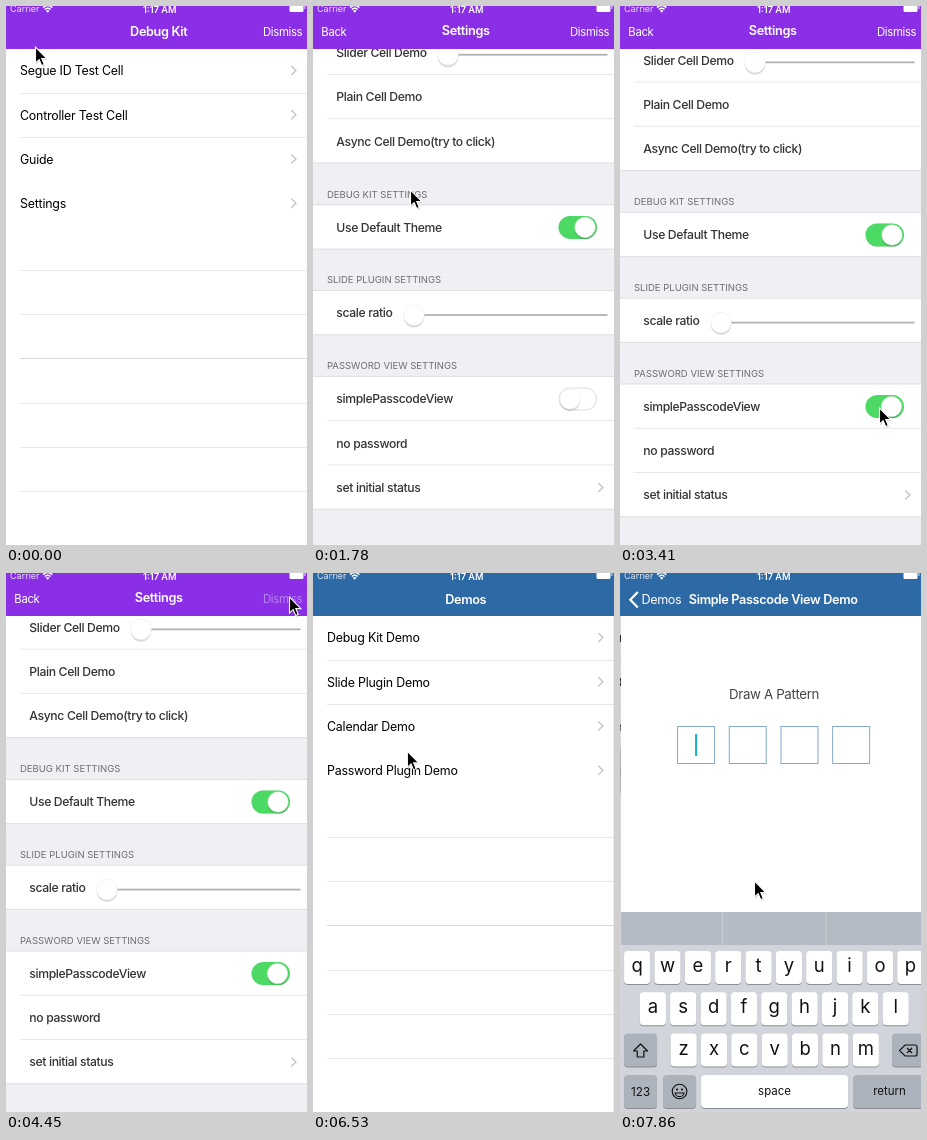
Animation of 301 by 539 pixels, one loop 8 s. Source, as an HTML page:

```html
<!DOCTYPE html>
<html lang="en">
<head>
<meta charset="utf-8">
<title>Settings walkthrough</title>
<style>
  html, body { margin: 0; width: 100%; height: 100%; overflow: hidden; background: #fff; }
  svg { display: block; overflow: hidden; }
  #stage { width: 100%; height: 100%; }
  text { font-family: Inter, Roboto, sans-serif; letter-spacing: -.027em; white-space: pre; }
  .caps { letter-spacing: 0; }
  .row { letter-spacing: -.017em; }
  .cell { letter-spacing: -.03em; font-weight: 500; }
</style>
</head>
<body>
<svg id="stage" viewBox="0 0 301 539"></svg>
<script>
const W = 301, H = 539, ROW = 44.25, BAR = 43;
const LOOP = 8000, STEP = 148, LAST = 53;
const PURPLE = '#8a2fe6', BLUE = '#2d69a5', LINE = '#e8e8ea', DARK = '#333';

// ---- drawing helpers ----
const rect = (x, y, w, h, fill, extra = '') =>
  `<rect x="${x}" y="${y}" width="${w}" height="${h}" fill="${fill}" ${extra}/>`;
const group = (id, body, extra = '') => `<g id="${id}" ${extra}>${body}</g>`;
const path = (d, stroke, width, extra = '') =>
  `<path d="${d}" fill="none" stroke="${stroke}" stroke-width="${width}" ${extra}/>`;
// y is the middle of the capitals
const label = (s, x, y, size = 12.3, fill = '#000', extra = '') =>
  `<text x="${x}" y="${y + size * 0.36}" font-size="${size}" fill="${fill}" ${extra}>${s}</text>`;
const MID = 'text-anchor="middle"';
const title = (s, y) => label(s, 152.7, y, 12.7, '#fff', `${MID} font-weight="600"`);
const chevron = y => path(`M285.3 ${y - 4.5}l4.6 4.5l-4.6 4.5`, '#c4c4c9', 1.4);
const dim = id => rect(0, 0, W, H, '#000', `id="${id}" opacity="0"`);
const knob = (x, y, r, id = '') =>
  `<g id="${id}"><circle cx="${x}" cy="${y + 2}" r="${r}" fill="#000" opacity=".15"/>` +
  `<circle cx="${x}" cy="${y}" r="${r}" fill="#fff" stroke="#e6e6e6" stroke-width=".5"/></g>`;

function menu(rows, pickId) {
  let s = rect(0, 0, W, H, '#fff');
  for (const i of [1, 2, 5, 6, 7, 8, 9, 10])
    s += rect(14, Math.floor(BAR + i * ROW), W, 1, i === 7 ? '#dadada' : LINE);
  s += rect(0, 176, W, 44, '#d9d9d9', `id="${pickId}"`);
  rows.forEach((name, i) => {
    const y = 65 + i * ROW;
    s += label(name, 14, y, 12.4, '#000', 'class="row"') + chevron(y - .5);
  });
  return s;
}

// ---- settings page ----
const toggle = (y, id, on) =>
  rect(246, y - 11, 37.5, 22, '#fff', 'rx="11" stroke="#dcdcdc"') +
  rect(245.5, y - 11.5, 38.5, 23, '#4cd964', `rx="11.5" id="${id}-on" opacity="${on}"`) +
  knob(on ? 272 : 257, y, 10.2, id + '-knob');
const slider = (x, y) => rect(x, y - 1, 294.5 - x, 1.8, '#b2b2b4') + knob(x, y, 10.3);

const sections = [
  { top: 83.5, head: 'DEBUG KIT DEMO', cells: [
    ['Detail Cell Demo'], ['INPUT CELL DEFAULT VALUE'],
    ['Switch Cell Demo', y => toggle(y, 'demo', 0)],
    ['Slider Cell Demo', y => slider(135, y + 2)],
    ['Plain Cell Demo'], ['Async Cell Demo(try to click)']] },
  { top: 390.8, head: 'DEBUG KIT SETTINGS', cells: [['Use Default Theme', y => toggle(y, 'theme', 1)]] },
  { top: 476.5, head: 'SLIDE PLUGIN SETTINGS', cells: [['scale ratio', y => slider(101, y + 2)]] },
  { top: 562.4, head: 'PASSWORD VIEW SETTINGS', cells: [
    ['simplePasscodeView', y => toggle(y, 'pass', 0)], ['no password'],
    ['set initial status', chevron]] }
];

function section({ top, head, cells }) {
  const h = cells.length * ROW;
  let s = label(head, 14, top - 10.5, 9.5, '#6d6d72', 'class="caps"') +
    rect(0, top, W, h, '#fff') +
    rect(0, top - .5, W, 1, '#dfdfe3') + rect(0, top + h - .5, W, 1, '#dfdfe3');
  cells.forEach(([name, extra], i) => {
    const y = top + i * ROW + 22.6;
    if (i) s += rect(14, top + i * ROW - .5, W, 1, LINE);
    s += name.startsWith('INPUT')
      ? label(name, 21.7, y, 10.3, '#000', 'class="row"')
      : label(name, 23.3, y, 12.2, DARK, 'class="cell"');
    if (extra) s += extra(y);
  });
  return s;
}

const settingsPage =
  group('edge', rect(-4, 0, 4, H, '#000', 'opacity=".03"') +
    rect(-1.5, 0, 1.5, H, '#000', 'opacity=".07"')) +
  `<svg width="${W}" height="${H}">` +
  rect(0, 0, W, H, '#efeff4') + group('scroll', sections.map(section).join('')) +
  rect(0, 0, W, BAR, PURPLE) + title('Settings', 24.5) +
  label('Back', 8.3, 26, 11.3, '#fff') +
  label('Dismiss', 257, 26, 11.3, '#fff', 'id="dismiss"') + '</svg>';

const homePage =
  menu(['Segue ID Test Cell', 'Controller Test Cell', 'Guide', 'Settings'], 'home-pick') +
  rect(0, 0, W, BAR, PURPLE) + title('Debug Kit', 25) +
  label('Dismiss', 257, 26, 11.3, '#fff') + dim('home-dim');

// ---- passcode page ----
function key(x, y, w, s = '', size = 12, special = false) {
  const cy = y + (size > 14 ? 14.5 : 16.3);
  return rect(x, y + 1, w, 33, '#8b8e94', 'rx="4"') +
    rect(x, y, w, 33, special ? '#acb3bd' : '#fff', 'rx="4"') +
    label(s, x + w / 2, cy, size, '#111', `${MID} class="caps"`);
}
const keyRow = (letters, x, y) =>
  [...letters].map((c, i) => key(x + i * 30.35, y, 26.2, c, 18.5)).join('');

const keyboard =
  rect(0, 339, W, 200, '#d1d5db') + rect(0, 339, W, 33, '#b5bbc4') +
  rect(101, 339, 1, 33, '#cdd1d7') + rect(204.5, 339, 1, 33, '#cdd1d7') +
  keyRow('qwertyuiop', 3, 378) + keyRow('asdfghjkl', 18.7, 419.3) + keyRow('zxcvbnm', 49.5, 460.6) +
  key(3, 460.6, 33, '', 12, true) + key(271, 460.6, 34, '', 12, true) +
  key(3, 502, 33, '123', 11.7, true) + key(42, 502, 33, '', 12, true) +
  key(80, 502, 147, 'space', 11.5) + key(232, 502, 73, 'return', 11.5, true) +
  path('M19.5 471l-7 7h3.7v6h6.6v-6h3.7z', '#111', 1.2, 'stroke-linejoin="round"') +
  path('M284 472h10q2 0 2 2v7q0 2-2 2h-10l-5.5-5.5zM286 475l5 5m0-5l-5 5', '#111', 1.2) +
  '<circle cx="58.5" cy="518.5" r="7.3" fill="none" stroke="#111" stroke-width="1.1"/>' +
  '<circle cx="56" cy="516.5" r="1"/><circle cx="61" cy="516.5" r="1"/>' +
  path('M54 520a4.6 4.6 0 0 0 9 0z', '#111', 1.1);

const passcodePage =
  rect(-1, BAR, 1, H, '#000', 'opacity=".07"') + rect(0, BAR, W, H, '#fff') +
  label('Draw A Pattern', 153, 121, 13.3, '#444', MID) +
  [0, 1, 2, 3].map(i =>
    rect(56.5 + i * 51.7, 153.5, 37, 37, '#fff', 'stroke="#86a9cb"')).join('') +
  rect(74, 161, 2, 22, '#14b4c4') + keyboard;

// ---- whole stage ----
const demosBar =
  rect(0, 0, W, BAR, BLUE) + group('demos-title', title('Demos', 26.7)) +
  group('passcode-title', title('Simple Passcode View Demo', 26.7)) +
  group('back-label', label('Demos', 21, 26.7, 12.6, '#fff')) +
  path('M17.8 19l-7.5 7.7l7.5 7.7', '#fff', 2.2, 'id="back-arrow"');

const ball = '<circle cx="22" cy="18" r="22" fill="#8a2fe6"/>' +
  label('Debug', 21.5, 18, 11, '#fff', `${MID} font-weight="600"`);

const status =
  label('Carrier', 4, 3.2, 9, '#fff', 'class="caps" opacity=".85"') +
  label('1:17 AM', 153.7, 3.2, 9.2, '#fff', `class="caps" font-weight="600" ${MID}`) +
  path('M37 1.6q4.7-4 9.4 0M38.8 3.5q2.9-2.4 5.8 0', '#fff', 1.4) +
  '<path d="M39.9 4.7q1.8-1.2 3.6 0l-1.8 2z" fill="#fff"/>' +
  rect(283.5, -2, 14, 8, '#fff', 'rx="1.5"') + rect(298.3, 0, 1.2, 3, '#fff', 'opacity=".7"');

const ARROW = 'd="M.5 0V16L4.2 12.6L6.7 18.6L9.3 17.5L6.8 11.6H11.9Z"';
const arrow = `<path ${ARROW} transform="translate(.6 1.2)" opacity=".25"/>` +
  `<path ${ARROW} stroke="#fff" stroke-width="1.1"/>`;

document.getElementById('stage').innerHTML =
  group('demos', menu(['Debug Kit Demo', 'Slide Plugin Demo', 'Calendar Demo', 'Password Plugin Demo'],
    'demos-pick') + dim('demos-dim')) +
  group('passcode', passcodePage) + demosBar + group('ball', ball) +
  group('modal', group('home', homePage) + group('settings', settingsPage)) +
  status + group('cursor', arrow);

// ---- motion ----
const el = id => document.getElementById(id);
const move = (id, x, y = 0) => el(id).setAttribute('transform', `translate(${x} ${y})`);
const fade = (id, a) => el(id).setAttribute('opacity', a);

// critically damped spring, 0 to 1
function spring(ms) {
  if (ms <= 0) return 0;
  const a = ms * 0.018;
  return a > 10 ? 1 : 1 - (1 + a) * Math.exp(-a);
}

// linear track of [step, ...values]
function at(track, k) {
  const j = track.findIndex(p => p[0] > k);
  if (j === 0) return track[0].slice(1);
  if (j < 0) return track[track.length - 1].slice(1);
  const a = track[j - 1], b = track[j], f = (k - a[0]) / (b[0] - a[0]);
  return a.slice(1).map((v, i) => v + (b[i + 1] - v) * f);
}

const pointer = [
  [0, 29, 41], [4, 77, 196], [6, 77, 196], [10, 95, 390], [12, 97, 184], [13, 98, 184],
  [16, 201, 370], [19, 261, 404], [20, 259, 402], [26, 259, 402], [27, 262, 30], [28, 283, 24],
  [30, 283, 24], [35, 289, 25], [38, 289, 25], [39, 131, 189], [46, 79, 174], [47, 86, 196],
  [50, 86, 196], [53, 134, 308]];
const scrollTrack = [[9, 0], [10, 22], [12, 192], [13, 192], [15, 185], [16, 184.4]];
const passTrack = [[21, 0], [22, .5], [23, 1]];
const ballTrack = [[40, 1], [43, 0]];

function draw(time) {
  const k = Math.min(LAST, Math.floor(time / STEP));
  const t = k * 148.3;

  const push = spring(t - 781);
  move('home', -90 * push);
  fade('home-dim', .1 * push);
  move('settings', W * (1 - push));
  fade('edge', Math.min(1, 4 * push));
  fade('home-pick', k >= 4 ? 1 : 0);

  move('scroll', 0, -at(scrollTrack, k)[0]);
  const on = at(passTrack, k)[0];
  fade('pass-on', on);
  move('pass-knob', 14.5 * on);

  fade('dismiss', k >= 30 ? .4 : 1);
  move('modal', 0, H * spring(t - 4500));
  fade('ball', at(ballTrack, k)[0]);

  const enter = spring(t - 7425);
  move('demos', -90 * enter);
  fade('demos-dim', .1 * enter);
  fade('demos-pick', k >= 49 ? 1 : 0);
  move('passcode', W * (1 - enter));
  move('demos-title', -111 * enter);
  fade('demos-title', Math.max(0, 1 - 2 * enter));
  move('back-label', 111 * (1 - enter));
  fade('back-label', Math.max(0, 2 * enter - 1));
  fade('back-arrow', enter);
  move('passcode-title', 150 * (1 - enter));
  fade('passcode-title', enter);

  move('cursor', ...at(pointer, k));
  fade('cursor', k === 25 || k === 26 ? 0 : 1);
}

function tick() {
  draw(performance.now() % LOOP);
  requestAnimationFrame(tick);
}
tick();
</script>
</body>
</html>
```
